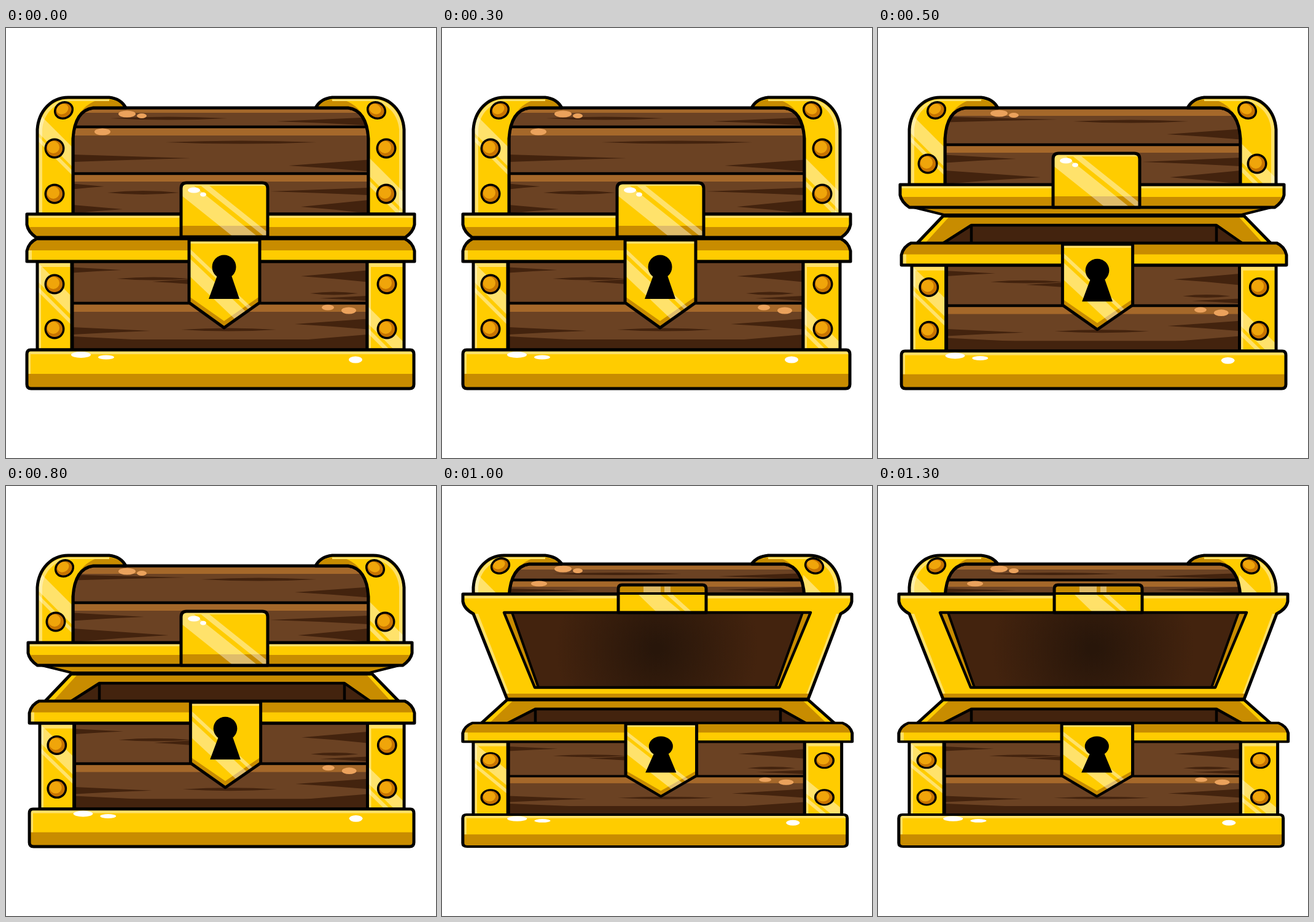
An HTML page with a canvas for the animation above (1500 ms loop, 700 by 700 pixels).

```html
<!DOCTYPE html>
<html lang="en">
<head>
<meta charset="utf-8">
<title>Treasure chest</title>
<style>
  html, body { margin: 0; width: 100%; height: 100%; overflow: hidden; background: #fff; }
  canvas { display: block; width: 700px; height: 700px; }
</style>
</head>
<body>
<canvas id="stage" width="700" height="700"></canvas>
<script>
const ctx = document.getElementById('stage').getContext('2d');
const GOLD = '#ffcc00', DARK_GOLD = '#c88c00', PALE_GOLD = '#ffe169';
const WOOD = '#6b4223', DARK_WOOD = '#43230e', LIGHT_WOOD = '#a5682a', PEACH = '#eba25c';
const STEP = 500;

const toPath = p => typeof p === 'string' ? new Path2D(p) : p;

function mirrored(d) {
  const path = new Path2D();
  path.addPath(new Path2D(d), new DOMMatrix([-1, 0, 0, 1, 699, 0]));
  return path;
}

function fill(d, color) {
  ctx.fillStyle = color;
  ctx.fill(toPath(d));
}

function line(d, width = 5) {
  ctx.strokeStyle = '#000';
  ctx.lineWidth = width;
  ctx.stroke(toPath(d));
}

function box(x1, y1, x2, y2, color) {
  ctx.fillStyle = color;
  ctx.fillRect(x1, y1, x2 - x1, y2 - y1);
}

function oval(x, y, rx, ry, color, turn = 0) {
  ctx.beginPath();
  ctx.ellipse(x, y, rx, ry, turn, 0, 2 * Math.PI);
  ctx.fillStyle = color;
  ctx.fill();
}

// Fills a shape, paints details inside it, then outlines it.
function panel(d, color, details, width = 5) {
  const path = toPath(d);
  ctx.save();
  ctx.clip(path);
  fill(path, color);
  details();
  ctx.restore();
  line(path, width);
}

function gloss(x, y, height, slope = 1) {
  const run = 160;
  fill(`M${x} ${y}l${run} ${run * slope}v${height}l${-run} ${-run * slope}z`, 'rgba(255,255,255,.42)');
}

// Wood grain: a wedge is thick at its first end, a grain is pointed at both.
const wedge = (x, y, tip, h) =>
  fill(`M${x} ${y - h / 2}L${tip} ${y}L${(x + tip) / 2} ${y + h * .22}L${x} ${y + h / 2}z`, DARK_WOOD);
const grain = (x1, x2, y, h) =>
  fill(`M${x1} ${y}Q${(x1 + x2) / 2} ${y - h} ${x2} ${y}Q${(x1 + x2) / 2} ${y + h} ${x1} ${y}z`, DARK_WOOD);

function rivet(x, y, rx = 15, ry = 15, turn = 0) {
  oval(x, y, rx + 1.5, ry + 1.5, '#000', turn);
  oval(x, y, rx - 2, ry - 2, '#c87400', turn);
  oval(x - 2, y - 2, rx - 5, ry - 5, '#f0a50a', turn);
}

function plankTop(y, height) {
  box(100, y, 600, y + height, LIGHT_WOOD);
  line(`M108 ${y - 1}H591`, 4.5);
}

function lidShell(top, bottom, wood) {
  const boards = `M109 ${bottom}V178Q112 ${top + 4} 142 ${top}H557Q587 ${top + 4} 590 178V${bottom}z`;
  panel(boards, WOOD, wood);
  const band = `M51 ${bottom}V165C53 135 74 113 101 113H168Q187 115 195 ${top}H142Q112 ${top + 4} 109 180V${bottom}z`;
  const fold = `M112 155Q122 126 150 117H172Q187 119 194 ${top}H142Q121 ${top + 4} 112 155z`;
  const edge = `M53 ${bottom}V165C56 137 76 116 101 116H168V119H103C79 121 61 140 59 165V${bottom}z`;
  const middle = (113 + bottom) / 2;
  for (const shape of [p => new Path2D(p), mirrored]) {
    panel(shape(band), GOLD, () => {
      fill(shape(fold), DARK_GOLD);
      fill(shape(edge), PALE_GOLD);
      gloss(50, 136, 32);
      gloss(50, 174, 8);
      gloss(588, middle, 30);
      gloss(588, middle + 37, 9);
    });
  }
}

function lidRim(left, right, top, bottom) {
  panel(`M${left} ${top}H${right}V${top + 17}Q${right - 2} ${bottom - 9} ${right - 15} ${bottom}` +
    `H${left + 15}Q${left + 2} ${bottom - 9} ${left} ${top + 17}z`, GOLD, () => {
    box(left, top, right, top + 6, PALE_GOLD);
    box(left, bottom - 17, right, bottom, DARK_GOLD);
  });
}

function latch(x, y) {
  panel(`M${x} ${y + 88}V${y + 9}Q${x} ${y} ${x + 9} ${y}H${x + 132}Q${x + 141} ${y} ${x + 141} ${y + 9}V${y + 88}z`,
    GOLD, () => {
      box(x, y + 70, x + 142, y + 90, DARK_GOLD);
      gloss(x, y - 12, 32, .8);
      gloss(x, y - 32, 11, .8);
      box(x, y, x + 141, y + 5, PALE_GOLD);
      oval(x + 21, y + 12, 10, 4.5, '#fff');
      oval(x + 36, y + 19, 5, 3.5, '#fff');
    });
}

function keyPlate() {
  panel('M298 345H413V447L355 488L298 447z', GOLD, () => {
    fill('M298 437L355 477L413 437V449L355 490L298 449z', DARK_GOLD);
    gloss(298, 374, 29, .95);
    gloss(298, 358, 8, .95);
    box(298, 345, 413, 351, PALE_GOLD);
  });
  oval(355, 389, 19.5, 19.5, '#000');
  fill('M345 400H366L380 441H330z', '#000');
}

function sideBand(x1, x2) {
  panel(`M${x1} 380H${x2}V524H${x1}z`, GOLD, () => {
    box(x1, 380, x1 + 6, 524, PALE_GOLD);
    box(x1, 380, x2, 389, PALE_GOLD);
    gloss(50, 380, 31);
    gloss(50, 419, 8);
    gloss(588, 452, 28);
    gloss(588, 487, 9);
  });
}

// The lower half, drawn closed and then squeezed towards its floor.
function body({ x = 0, sx = 1, sy = 1, baseEnd = 664 }) {
  ctx.save();
  ctx.translate(x, 587 * (1 - sy));
  ctx.scale(sx, sy);

  panel('M108 380H588V524H108z', WOOD, () => {
    wedge(108, 394, 188, 9);
    grain(180, 300, 408, 5);
    wedge(300, 413, 238, 8);
    wedge(588, 404, 480, 19);
    grain(495, 573, 432, 5);
    wedge(588, 440, 510, 8);
    plankTop(449, 13);
    wedge(108, 493, 235, 12);
    grain(285, 440, 491, 5);
    wedge(588, 482, 470, 17);
    wedge(588, 508, 480, 18);
    wedge(108, 508, 225, 12);
    box(108, 507, 588, 524, DARK_WOOD);
    oval(524, 455, 10, 4.5, PEACH);
    oval(558, 460, 12, 5.5, PEACH);
  });
  sideBand(51, 107);
  sideBand(588, 648);
  for (const y of [417, 490]) {
    rivet(79, y);
    rivet(620, y);
  }

  panel('M34 380V363Q37 349 50 343H649Q662 349 665 363V380z', GOLD, () => {
    box(30, 343, 670, 362, DARK_GOLD);
    box(36, 362, 42, 380, PALE_GOLD);
  });
  panel(`M40 524H${baseEnd - 6}Q${baseEnd} 524 ${baseEnd} 531V580Q${baseEnd} 587 ${baseEnd - 7} 587H41Q34 587 34 580V531Q34 524 40 524z`,
    GOLD, () => {
      box(34, 524, baseEnd, 531, PALE_GOLD);
      box(34, 524, 40, 564, PALE_GOLD);
      box(34, 563, baseEnd, 588, DARK_GOLD);
    });
  oval(122, 532, 16, 5, '#fff');
  oval(163, 536, 13, 3.5, '#fff');
  oval(569, 540, 11, 5.5, '#fff');
  keyPlate();
  ctx.restore();
}

function opening(back, front) {
  const inner = back + 15;
  panel(`M106 ${back}H596L640 ${front}H63z`, DARK_GOLD, () => {
    fill(`M106 ${back}L63 ${front}H76L117 ${back}z`, GOLD);
    fill(`M596 ${back}L640 ${front}H627L586 ${back}z`, GOLD);
    fill(`M152 ${inner}H551L594 ${front}H105z`, DARK_WOOD);
    line(`M105 ${front}L152 ${inner}H551L594 ${front}M152 ${inner}V${front}M551 ${inner}V${front}`, 4.5);
  });
}

function topShine(y) {
  oval(197, y, 14, 5.5, PEACH);
  oval(221, y + 3, 8, 4, PEACH);
}

function closed() {
  body({});
  lidShell(130, 303, () => {
    box(100, 130, 600, 138, LIGHT_WOOD);
    grain(170, 360, 147, 5);
    wedge(590, 152, 440, 13);
    plankTop(162, 13);
    grain(260, 505, 186, 5);
    wedge(108, 212, 300, 12);
    wedge(590, 224, 460, 19);
    plankTop(238, 12);
    wedge(108, 258, 160, 9);
    grain(165, 282, 268, 6);
    wedge(590, 266, 430, 12);
    wedge(590, 291, 480, 22);
    wedge(108, 295, 190, 14);
    topShine(140);
    oval(157, 169, 13, 5.5, PEACH);
  });
  rivet(94, 134, 15, 13, -.5);
  rivet(603, 134, 15, 13, .5);
  for (const y of [196, 270]) {
    rivet(79, y);
    rivet(619, y);
  }
  lidRim(34, 665, 303, 341);
  latch(285, 252);
}

function ajar() {
  panel('M50 290H648L592 304H107z', DARK_GOLD, () => {}, 4);
  lidShell(130, 256, () => {
    box(100, 130, 600, 143, LIGHT_WOOD);
    wedge(108, 149, 292, 9);
    grain(318, 505, 152, 5);
    wedge(590, 173, 470, 17);
    plankTop(191, 12);
    wedge(108, 213, 225, 13);
    wedge(590, 218, 430, 14);
    wedge(108, 243, 265, 22);
    wedge(590, 243, 475, 22);
    topShine(139);
  });
  rivet(95, 134, 15, 13, -.5);
  rivet(601, 134, 15, 13, .5);
  rivet(81, 221);
  rivet(617, 221);
  lidRim(36, 661, 255, 292);
  latch(285, 204);
  opening(306, 351);
  body({ x: 4.3, sx: .9935, sy: .971 });
}

function lidInside() {
  panel('M34 176H667V188Q665 200 649 208L596 347H106L51 208Q36 200 34 188z', GOLD, () => {
    box(30, 176, 670, 183, PALE_GOLD);
    fill('M51 208L106 347H113L59 208z', PALE_GOLD);
    fill('M649 208L596 347H590L642 208z', PALE_GOLD);
    box(100, 338, 600, 348, DARK_GOLD);
  });
  panel('M101 206H600L549 328H151z', DARK_GOLD, () => {
    const shade = ctx.createRadialGradient(350, 265, 8, 350, 265, 165);
    shade.addColorStop(0, '#28160a');
    shade.addColorStop(1, DARK_WOOD);
    fill('M114 206H587L543 328H157z', shade);
    line('M114 206L157 328M587 206L543 328', 4);
  }, 4.5);
  panel('M287 206V167Q287 161 293 161H424Q430 161 430 167V206z', GOLD, () => {
    box(287, 161, 430, 175, DARK_GOLD);
    box(328, 161, 356, 175, 'rgba(255,255,255,.4)');
    box(362, 161, 372, 175, 'rgba(255,255,255,.4)');
    fill('M320 177H356L391 206H350zM366 177H376L408 206H398z', PALE_GOLD);
  });
  line('M287 175H430', 4);
}

function open() {
  lidShell(127, 176, () => {
    box(100, 127, 600, 136, LIGHT_WOOD);
    grain(180, 390, 143, 4);
    wedge(590, 147, 450, 10);
    plankTop(154, 10);
    wedge(108, 170, 225, 6);
    wedge(590, 169, 450, 9);
    topShine(135);
    oval(158, 159, 13, 4.5, PEACH);
  });
  rivet(95, 130, 15, 12, -.35);
  rivet(606, 130, 15, 12, .35);
  lidInside();
  opening(348, 387);
  body({ x: -.3, sx: 1.0045, sy: .825, baseEnd: 657 });
}

const poses = [closed, ajar, open];
const start = performance.now();

function tick() {
  const elapsed = performance.now() - start;
  ctx.fillStyle = '#fff';
  ctx.fillRect(0, 0, 700, 700);
  ctx.lineJoin = 'round';
  poses[Math.floor(elapsed / STEP) % poses.length]();
  requestAnimationFrame(tick);
}
tick();
</script>
</body>
</html>
```
